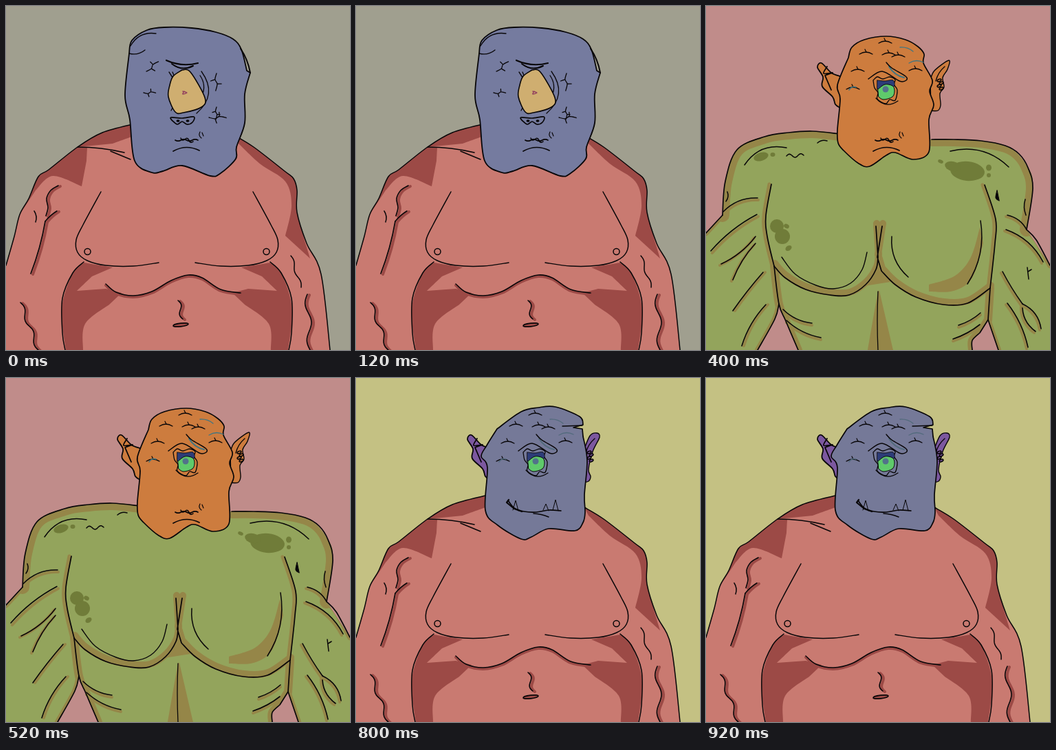
Animation of 500x500 px, one loop 1 s. Source, as an HTML page with a canvas:

```html
<!DOCTYPE html>
<html lang="en">
<head>
<meta charset="utf-8">
<title>Ogres</title>
<style>
html, body { margin: 0; width: 100%; height: 100%; overflow: hidden; }
canvas { display: block; width: 100vw; height: 100vh; }
</style>
</head>
<body>
<canvas id="stage" width="500" height="500"></canvas>
<script>
const ctx = document.getElementById('stage').getContext('2d');
const INK = '#080608';
ctx.lineCap = ctx.lineJoin = 'round';

// Smooth curve through "x,y x,y ..."; "/" marks a corner, ";" lifts the pen.
function curve(text) {
  const path = new Path2D();
  for (const stroke of text.split(';')) {
    stroke.split('/').forEach((part, n) => {
      const p = part.trim().split(/\s+/).map(s => s.split(',').map(Number));
      if (n) path.lineTo(...p[0]); else path.moveTo(...p[0]);
      for (let i = 0; i < p.length - 1; i++) {
        const b = p[i], c = p[i + 1], a = p[i - 1] || b, d = p[i + 2] || c;
        path.bezierCurveTo(
          b[0] + (c[0] - a[0]) / 6, b[1] + (c[1] - a[1]) / 6,
          c[0] - (d[0] - b[0]) / 6, c[1] - (d[1] - b[1]) / 6, ...c);
      }
    });
  }
  return path;
}

// Single arch from a to b; a positive rise bulges to the right of travel.
function bow(ax, ay, bx, by, rise = 0) {
  const path = new Path2D(), dx = bx - ax, dy = by - ay;
  const k = 2 * rise / Math.hypot(dx, dy);
  path.moveTo(ax, ay);
  path.quadraticCurveTo((ax + bx) / 2 - dy * k, (ay + by) / 2 + dx * k, bx, by);
  return path;
}

// Sine wiggle from a to b.
function wavy(ax, ay, bx, by, swing, waves) {
  const path = new Path2D(), dx = bx - ax, dy = by - ay;
  for (let i = 0; i <= 24; i++) {
    const t = i / 24;
    const k = swing * Math.sin(t * waves * 2 * Math.PI) / Math.hypot(dx, dy);
    path.lineTo(ax + dx * t - dy * k, ay + dy * t + dx * k);
  }
  return path;
}

const toPath = shape => typeof shape === 'string' ? curve(shape) : shape;

function line(shape, width = 1.5, color = INK, dx = 0, dy = 0) {
  ctx.save();
  ctx.translate(dx, dy);
  ctx.lineWidth = width;
  ctx.strokeStyle = color;
  ctx.stroke(toPath(shape));
  ctx.restore();
}

function fill(shape, color, edge = 0) {
  const path = toPath(shape);
  ctx.fillStyle = color;
  ctx.fill(path);
  if (edge) {
    path.closePath();
    line(path, edge);
  }
}

function oval(x, y, rx, ry, color, turn = 0, edge = 0) {
  const path = new Path2D();
  path.ellipse(x, y, rx, ry, turn, 0, 2 * Math.PI);
  fill(path, color, edge);
}

function shaded(shape, shade, dx = 3, dy = 1) {
  line(shape, 4, shade, dx, dy);
  line(shape, 1.6);
}

// Draws a half and its reflection; sum is left x plus right x.
function mirrored(sum, draw) {
  draw();
  ctx.save();
  ctx.translate(sum, 0);
  ctx.scale(-1, 1);
  draw();
  ctx.restore();
}

function fatBody() {
  const skin = '#c97a71', dark = '#9c4a46';
  const left = '188,171 140,184 104,205 62,238 47,248 33,280 20,303 12,335 0,377';
  const right = '332,188 360,205 405,240 418,251 423,268 423,300 437,345 458,390 471,500';
  fill(`${left}/0,500/471,500/${right.split(' ').reverse().join(' ')}`, skin);
  fill('188,171 140,184 104,205/155,200 188,188', dark);
  fill('104,205 62,238 47,248 33,280 20,303/43,268 68,247 110,262/117,225 118,206', dark);
  fill('332,188 360,205 405,240 418,251 423,268 423,300 442,367/406,334 415,290 406,255 370,230 338,200', dark);
  mirrored(497, () => {
    fill('113,373 155,380/125,393 103,414/145,411 168,417/150,434 115,462 112,500/87,500 81,440 97,388 113,373', dark);
    line('113,372 97,388 82,425 82,475 86,500');
    line('138,270 112,318 102,340 104,358 118,370 145,377 185,378 222,373');
    oval(118.5, 357, 4.5, 4.5, skin, 0, 1.5);
  });

  const fold = '145,404 160,416 185,421 212,415 240,399 265,391 285,395 312,412 341,417';
  shaded(fold, dark, 0, 2);
  line(left);
  line(right);
  line(bow(104, 205, 172, 213, -2));
  line(bow(152, 211, 181, 223));

  shaded('76,261 65,268 59,280 61,293 58,305', dark);
  shaded(bow(74, 298, 57, 313, 1), dark);
  shaded(bow(57, 313, 36, 389, -2), dark);
  shaded(wavy(21, 431, 47, 500, -3, 2), dark);
  shaded(wavy(438, 419, 442, 500, 4, 1.5), dark);
  shaded(wavy(250, 428, 257, 455, -3, 1), dark);
  line(bow(41, 298, 43, 314, -2));
  line(wavy(414, 363, 429, 409, -2, 1.5));
  oval(254, 463.5, 11, 2.3, dark, -.12, 1.7);
}

function buffBody({ skin, shade, spot }) {
  const shoulders = '24,304 28,255 45,209 85,190 120,184 155,182 195,186;328,194 360,194 400,196 435,203 455,215 468,235 475,265 466,325';
  const arms = '0,330 24,304;466,325 480,340 500,377;106,433 100,455 75,500;410,456 425,500';
  const flanks = '99,378 106,433 116,458 134,500;413,410 410,456/398,475 387,486 387,500';
  const sides = '95,259 87,305 89,335 99,378;405,260 421,310 420,345 413,410';
  const pecs = '99,378 115,395 145,412 180,420 208,420 232,405 247,383 250,365/247,320;256,320 249,365/255,385 275,405 305,423 345,434 380,432 413,410';
  const body = curve('0,330 24,304/28,255 45,209 85,190 155,182 195,186/328,194 360,194 435,203 468,235 475,265 466,325/500,377/500,500/425,500 410,456/398,475 387,486 387,500/134,500 116,458 106,433/100,455 75,500/0,500');

  fill(body, skin);
  ctx.save();
  ctx.clip(body);
  line(shoulders, 20, shade);
  line(arms, 8, shade);
  line(flanks, 12, shade);
  line(sides, 5, shade, -3);
  line(pecs, 10, shade, 1, -4);
  ctx.restore();
  fill('398,322 385,365 362,392 324,405/324,415 360,414 387,395 403,345', shade);
  fill('250,370 230,407/268,401', shade);
  fill('250,414 235,500/272,500 252,414', shade);

  shaded(bow(75, 279, 25, 299, 6), shade, 1, 3);
  shaded(bow(74, 303, 7, 356, 4), shade, 2, 3);
  for (const vein of [bow(72, 335, 22, 375, -4), bow(72, 345, 39, 398, 3)]) shaded(vein, shade, -2, 2);
  for (const vein of [bow(83, 387, 39, 443, 1), bow(87, 434, 52, 494, 4)]) shaded(vein, shade, 3, 0);
  for (const vein of [
    bow(438, 304, 466, 325, -4), bow(436, 325, 490, 372, -7), bow(431, 386, 460, 433, 1),
    bow(460, 433, 479, 473, 6), bow(460, 433, 487, 469, -6), bow(438, 432, 468, 496, -4)
  ]) shaded(vein, shade, -2, 2);
  for (const rib of [
    bow(112, 441, 154, 461, 4), bow(117, 457, 167, 482, 4),
    bow(399, 446, 367, 464, -2), bow(398, 463, 359, 484, -2)
  ]) shaded(rib, shade, 0, 3);

  oval(80, 219, 11, 6, spot, -.3);
  oval(97, 216, 3.5, 3, spot);
  oval(380, 240, 25, 14, spot, .1);
  oval(359, 233, 12, 7, spot, .2);
  oval(341, 226, 4, 2.5, spot, .4);
  oval(411, 235, 4, 4.5, spot);
  oval(411, 246, 3, 3, spot);
  oval(103, 320, 10, 10, spot);
  oval(111, 335, 11, 11, spot);
  oval(117, 320, 4, 3, spot, .5);
  oval(120, 352, 5, 3.5, spot, -.6);

  for (const edge of [shoulders, arms, flanks, sides, pecs]) line(edge, 1.7);
  line('110,365 130,390 160,406 185,411 210,403 227,383 234,358', 1.4);
  line(bow(270, 335, 294, 394, 8));
  line(bow(399, 312, 380, 404, -9));
  line(bow(250, 415, 250, 500, 1), 1.3);
  line(bow(56, 231, 117, 206, -11));
  line(bow(355, 211, 440, 234, -12));
  line(wavy(117, 218, 142, 217, -2.5, 1.5));
  line(bow(162, 199, 176, 196, -2));
  line(bow(29, 284, 31, 270, 2));
  line(bow(464, 281, 465, 304, 2));
  line(bow(467, 380, 469, 397));
  line(bow(468, 386, 473, 383));
  fill('423,268 421,279 426,283', INK, 1);
}

function squareHead(color) {
  fill('179,69 183,50 205,35 230,31 270,32 305,38 330,48 342,63 350,94/355,97 347,128 347,170 335,205 334,222 312,243 297,247 256,232 228,240 212,242 187,225 180,165 173,130 179,69', color, 1.8);
  line(bow(181, 58, 218, 40, -7), 1.3);
  line(bow(179, 69, 202, 64, 3), 1.3);
  line(bow(341, 62, 355, 97, -2), 2);
}

function ears(color, right) {
  fill('195,102 182,97 168,83 162,89 170,103 169,117 184,132 188,143 195,148', color, 1.8);
  line('176,88 171,98 184,97/173,101 182,122', 1.8);
  fill(right, color, 1.4);
  line(bow(347, 88, 334, 109, 2), 1.3);
  for (let i = 0; i < 4; i++) oval(339 + i % 2 * 3, 108 + i * 4, 3, 1.6, color, -.4, 1.6);
}

function scar(x, y, tint = INK) {
  line(bow(x - 10, y + 3, x + 9, y + 3, -3), 1.3, tint);
  line(bow(x, y, x - 2, y - 4), 1.2, tint);
}

function scars(tint) {
  for (const [x, y] of [[261, 51], [233, 67], [266, 68], [221, 92], [214, 118], [280, 71], [305, 91]]) scar(x, y);
  line(bow(282, 60, 301, 66, -2), 1.3, tint);
  line(bow(295, 83, 316, 82, -3), 1.3, tint);
  line(bow(208, 122, 218, 118, -2), 1.5, tint);
}

function greenEye(tint) {
  line(bow(266, 88, 288, 104, 3), 2, tint);
  line('262,82 270,90 290,102 291,108 281,109 256,95 236,106');
  line('243,108 249,103 257,106 267,103 275,107 273,114 278,122 275,137 267,136 261,142 249,135 250,126 245,119 243,108', 1.3);
  fill('249,108 260,109 272,108 272,118 249,121', '#2d3c78', .8);
  fill('250,121 260,114 271,116 274,123 271,132 258,136 251,132', '#5fca6b', 1);
  oval(261, 121, 4.5, 4.5, '#52728a');
  line(bow(247, 134, 279, 138, 7), 1.3);
}

// Main crack with two side twigs.
function crack(x, y, angle, size) {
  ctx.save();
  ctx.translate(x, y);
  ctx.rotate(angle);
  ctx.scale(size, size);
  line('0,0 9,1 15,-3 25,-2;9,1 12,7;15,-3 14,-9', 1.3 / size);
  ctx.restore();
}

function yellowEye() {
  for (let i = 0; i < 2; i++) {
    line(bow(237 + i * 5, 96, 240, 152 - i * 14, -9 + i * 3), 1.3);
    line(bow(284 - i * 2, 95 + i * 6, 277 + i * 8, 156 - i * 26, -14 + i * 10), 1.3);
  }
  fill('256,93 268,96 289,133 284,147 258,155 246,154 236,132 238,115 243,102 256,93', '#cfae70', 1.6);
  oval(259.5, 126.5, 2.5, 2.5, '#cfae70');
  line('257,124 263,126 257,128 259,124', 1.5, '#92405e');
  line(bow(233, 79, 279, 83, 4), 2.2);
  line(bow(241, 84, 272, 87, 5), 2);
  crack(204, 95, -.6, .9);
  crack(200, 126, .1, .7);
  crack(306, 98, 1.7, 1);
  crack(295, 162, .1, 1);
  crack(306, 147, 1.7, .7);
  line('241,166 240,162 256,163 273,161 271,169 263,172 256,168 249,172 241,166', 1.7);
  for (const x of [250, 264]) oval(x, 167, 2.5, 1.7, INK);
}

function frown() {
  line(wavy(246, 195, 279, 195, 1.2, 2), 1.8);
  line(wavy(254, 192, 272, 197, 2.2, 1.5), 1.5);
  line(bow(243, 211, 281, 210, -5), 1.7);
  line(bow(282, 183, 284, 192, 2), 1.2);
  line(bow(285, 184, 287, 189), 1.2);
}

function tusks() {
  const lip = bow(219, 202, 300, 207, -10);
  line(lip, 4, '#d79c66', 0, 2);
  fill('219,177 238,188 242,195/224,196 219,177', '#e4cb80', 1.5);
  fill('271,194 275,185 286,174/284,182 287,198', '#e4cb80', 1.5);
  for (let i = 0; i < 3; i++) {
    line(bow(222 + i * 3, 182 + i, 227 + i * 4, 194), 1);
    line(bow(283 - i * 2, 178 + i * 2, 282 - i * 3, 193), 1);
  }
  line(lip, 2);
  line('280,178 286,172 285,180/287,197', 2);
}

function smirk() {
  line('221,178 230,189 244,194 262,195 280,192 298,193', 1.7);
  line('222,177 219,181/230,190 241,194', 2.2);
  for (const [x, h] of [[232, 14], [276, 9], [290, 15]]) line(`${x - 4},192/${x},${192 - h}/${x + 4},193`, 1);
  line(bow(258, 197, 280, 202, -1));
}

function blueOgre() {
  squareHead('#757b9f');
  yellowEye();
  frown();
}

function tuskOgre() {
  oval(171, 101, 6, 9, '#60308f', .1, 1.3);
  line(bow(174, 96, 171, 105, -3), 1.2, '#32165c');
  squareHead('#919b75');
  scars('#486c80');
  greenEye('#486c80');
  tusks();
}

function orangeOgre() {
  const skin = '#cd7c3e';
  ears(skin, '326,108 332,94 353,79 351,92 344,104 346,118 340,127 341,144 337,152 327,152');
  fill('207,75 212,60 230,49 262,44 290,49 308,59 317,70 316,83 329,108 325,124 331,144 324,165 324,212 301,223 275,213 262,217 238,233 222,229 200,210 192,199 191,180 195,135 191,115 207,75', skin, 1.7);
  scars('#3d7684');
  greenEye('#3d7684');
  frown();
}

function purpleEarOgre() {
  ears('#7c589f', '330,108 340,84 350,80 354,86 344,107 338,133 341,143 338,150 329,152');
  fill('205,74 240,49 265,43 290,42 325,56 330,68/316,72 329,74/330,85 336,120 332,170 333,195 330,210 318,222 280,219 255,231 240,234 206,214 188,192 191,130 182,114 190,98 205,74', '#757998', 1.7);
  line(bow(300, 70, 329, 69), 1.3);
  scars('#526b7c');
  greenEye('#526b7c');
  smirk();
}

const purple = { skin: '#a25a7b', shade: '#904687', spot: '#7d3657' };
const green = { skin: '#93a45c', shade: '#958648', spot: '#707c39' };
const scenes = [
  { back: '#a09f8f', body: fatBody, head: blueOgre },
  { back: '#c08c88', body: () => buffBody(purple), head: tuskOgre },
  { back: '#c08c8a', body: () => buffBody(green), head: orangeOgre },
  { back: '#c4c183', body: fatBody, head: purpleEarOgre }
];
const HOLD = 200, LOOP = 1000;
let shown = -1;

function tick() {
  const step = Math.floor(performance.now() % LOOP / HOLD);
  const next = Math.min(step, scenes.length - 1);
  if (next !== shown) {
    shown = next;
    const { back, body, head } = scenes[next];
    ctx.fillStyle = back;
    ctx.fillRect(0, 0, 500, 500);
    body();
    head();
  }
  requestAnimationFrame(tick);
}
tick();
</script>
</body>
</html>
```
